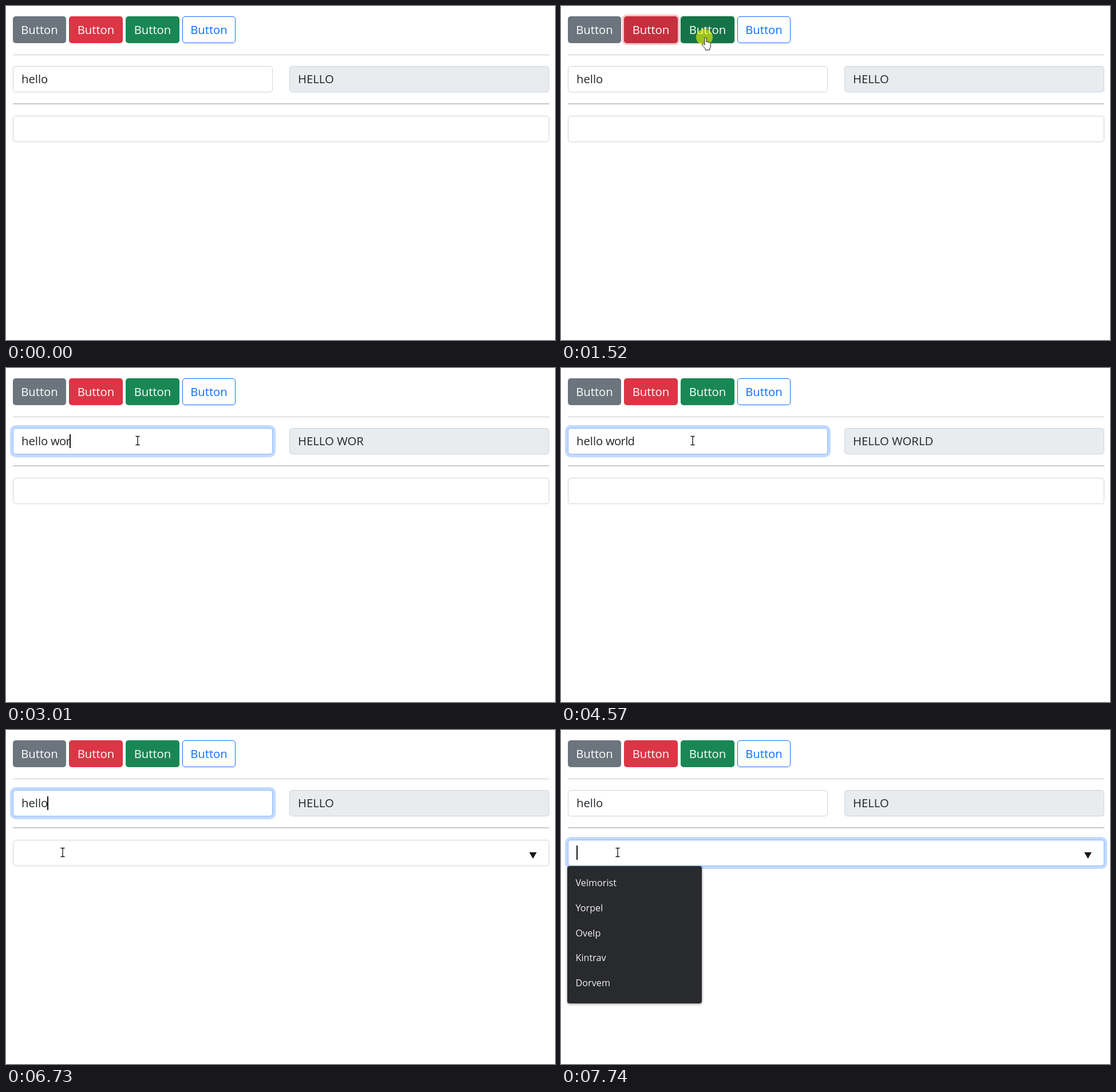
An HTML page for the animation above (8000 ms loop, 959 px wide and 584 px high).

```html
<!DOCTYPE html>
<html lang="en">
<head>
<meta charset="utf-8">
<title>Form controls</title>
<style>
html, body { margin: 0; width: 100%; height: 100%; overflow: hidden; background: #fff; }
body { position: relative; font: 400 20.3px "Open Sans", "Noto Sans", sans-serif; color: #212529; }
body *, .mouse { box-sizing: border-box; }
body > * { position: absolute; }

/* every part runs on the same 8 s clock */
.btn, .field, .mouse { animation: 8s ease-in-out infinite; }
.step { animation: 8s step-end infinite; }

.btn { top: 18px; width: 93px; height: 47px; border: 1px solid transparent; border-radius: 5px;
  line-height: 44px; text-align: center; color: #fff; }
.grey { left: 12px; background: #6c757d; background-clip: border-box; animation-name: grey; }
.red { left: 110px; width: 94px; background: #dc3545; animation-name: red; }
.green { left: 209px; width: 94px; background: #198754; animation-name: green; }
.blue { left: 308px; border-color: #0d6efd; color: #0d6efd; animation-name: blue; }

.rule { left: 12px; width: 937px; height: 1px; top: 85px; background: #c8c9cb; }
.rule.low { top: 170px; height: 2px; background: #c7c8ca; }

.field { left: 12px; top: 105px; width: 454px; height: 46px; padding-left: 14px; line-height: 42px;
  border: 1px solid #ced4da; border-radius: 5px; background: #fff; white-space: pre; }
.first { animation-name: first; }
.upper { left: 495px; background: #e9ecef; }
.list { top: 192px; width: 937px; animation-name: list; }
.tail { letter-spacing: -.7px; }
.w { animation-name: w; } .o { animation-name: o; } .r { animation-name: r; }
.l { animation-name: l; } .d { animation-name: d; }

.caret { width: 2px; height: 24px; background: #111; top: 116px; left: 72px; animation-name: caret; }
.caret.low { top: 202px; left: 27px; height: 25px; animation-name: caret-low; }

.toggle { left: 914px; top: 213px; animation-name: toggle; }
.menu { left: 11px; top: 238px; width: 234.5px; height: 239.5px; padding: 8px 0 0 14.5px; border-radius: 4px;
  background: #292a2d; box-shadow: 0 1px 4px rgba(0,0,0,.45); color: #f1f1f2;
  font-size: 16.2px; line-height: 43.8px; animation-name: menu; }

.mouse { left: 0; top: 0; width: 1px; height: 1px; overflow: visible; animation-name: move; animation-timing-function: linear; }
.mouse path { fill: #fff; stroke: #111; stroke-linejoin: round; }
.mouse .beam { fill: none; stroke-width: 1.3; animation-name: beam; }
.arrow { animation-name: arrow; }
.hand { animation-name: hand; }
.spot { fill: rgba(255,255,0,.58); animation-name: spot; }

@keyframes grey {
  0%, 6.5% { background-color: #6c757d; }
  8.375%, 14.125% { background-color: #5c636a; }
  0%, 8.75% { box-shadow: 0 0 0 0 rgba(130,138,145,0); }
  10.625%, 14.125% { box-shadow: 0 0 0 5px rgba(130,138,145,.5); }
  16%, 100% { background-color: #6c757d; box-shadow: 0 0 0 0 rgba(130,138,145,0); }
}
@keyframes red {
  0%, 11.875% { background-color: #dc3545; }
  13.75%, 18.25% { background-color: #bb2d3b; }
  0%, 14.125% { box-shadow: 0 0 0 0 rgba(225,83,97,0); }
  16%, 18.25% { box-shadow: 0 0 0 5px rgba(225,83,97,.5); }
  20.125%, 100% { background-color: #dc3545; box-shadow: 0 0 0 0 rgba(225,83,97,0); }
}
@keyframes green {
  0%, 16.25% { background-color: #198754; }
  18.125%, 22.375% { background-color: #157347; }
  0%, 18.25% { box-shadow: 0 0 0 0 rgba(60,153,110,0); }
  20.125%, 22.375% { box-shadow: 0 0 0 5px rgba(60,153,110,.5); }
  24.25%, 100% { background-color: #198754; box-shadow: 0 0 0 0 rgba(60,153,110,0); }
}
@keyframes blue {
  0%, 20.375% { background-color: #fff; color: #0d6efd; }
  22.25%, 24.38% { background-color: #0d6efd; color: #fff; }
  26.25%, 100% { background-color: #fff; color: #0d6efd; }
  0%, 22.375% { box-shadow: 0 0 0 0 rgba(13,110,253,0); }
  24.25%, 27.375% { box-shadow: 0 0 0 5px rgba(13,110,253,.5); }
  29.25%, 100% { box-shadow: 0 0 0 0 rgba(13,110,253,0); }
}
@keyframes first {
  0%, 27.375% { border-color: #ced4da; box-shadow: 0 0 0 0 rgba(13,110,253,0); }
  29.25%, 84.9% { border-color: #86b7fe; box-shadow: 0 0 0 5px rgba(13,110,253,.25); }
  86.75%, 100% { border-color: #ced4da; box-shadow: 0 0 0 0 rgba(13,110,253,0); }
}
@keyframes list {
  0%, 84.9% { border-color: #ced4da; box-shadow: 0 0 0 0 rgba(13,110,253,0); }
  86.75%, 100% { border-color: #86b7fe; box-shadow: 0 0 0 5px rgba(13,110,253,.25); }
}

/* typing */
@keyframes w { 0%, 63.25% { opacity: 0; } 35.25% { opacity: 1; } 100% { opacity: 0; } }
@keyframes o { 0%, 63.25% { opacity: 0; } 36.43% { opacity: 1; } 100% { opacity: 0; } }
@keyframes r { 0%, 63.25% { opacity: 0; } 37.6% { opacity: 1; } 100% { opacity: 0; } }
@keyframes l { 0%, 63.25% { opacity: 0; } 39.75% { opacity: 1; } 100% { opacity: 0; } }
@keyframes d { 0%, 63.25% { opacity: 0; } 41.6% { opacity: 1; } 100% { opacity: 0; } }
@keyframes caret {
  0% { opacity: 0; left: 72px; }
  27.4% { opacity: 1; left: 72px; }
  32.12% { opacity: 1; left: 77px; }
  35.25% { opacity: 1; left: 92px; }
  36.43% { opacity: 1; left: 104px; }
  37.6% { opacity: 1; left: 111px; }
  39.75% { opacity: 1; left: 117px; }
  41.6% { opacity: 1; left: 129px; }
  47% { opacity: 0; left: 129px; }
  52.37% { opacity: 1; left: 129px; }
  57.12% { opacity: 0; left: 129px; }
  66.62% { opacity: 1; left: 77px; }
  71.99% { opacity: 0; left: 77px; }
  76.62% { opacity: 1; left: 72px; }
  84.95%, 100% { opacity: 0; left: 72px; }
}
@keyframes caret-low {
  0%, 90.62% { opacity: 0; }
  84.95%, 96.74%, 100% { opacity: 1; }
}
@keyframes toggle { 0% { opacity: 0; } 83%, 100% { opacity: 1; } }
@keyframes menu { 0% { opacity: 0; } 85.86%, 100% { opacity: 1; } }

/* pointer */
@keyframes move {
  0%, 1.625% { transform: translate(343px, 270px); }
  3.75% { transform: translate(197px, 168px); }
  5.4% { transform: translate(98px, 102px); }
  6.5% { transform: translate(76px, 68px); }
  7.75%, 10.9% { transform: translate(66px, 50px); }
  11.75% { transform: translate(104px, 51px); }
  12.5% { transform: translate(147px, 50px); }
  13.25%, 15.6% { transform: translate(153px, 51px); }
  16.9% { transform: translate(238px, 57px); }
  17.5%, 19.6% { transform: translate(252px, 55px); }
  21% { transform: translate(327px, 53px); }
  21.75%, 22.9% { transform: translate(340px, 52px); }
  23.65% { transform: translate(318px, 70px); }
  24.375% { transform: translate(286px, 94px); }
  25.9% { transform: translate(243px, 117px); }
  27%, 80.5% { transform: translate(230px, 127px); }
  82.2% { transform: translate(160px, 172px); }
  83.8%, 100% { transform: translate(99px, 214px); }
}
@keyframes arrow {
  0%, 6.6%, 25.3%, 82.9%, 100% { opacity: 0; }
  1.625%, 23.5%, 81.4% { opacity: 1; }
}
@keyframes hand { 0%, 23.5%, 100% { opacity: 0; } 6.6% { opacity: 1; } }
@keyframes beam { 0%, 81.4% { opacity: 0; } 25.3%, 82.9%, 100% { opacity: 1; } }
@keyframes spot {
  0%, 10.2%, 15.6%, 19.6%, 23.4%, 28.9%, 86.7%, 100% { opacity: 0; }
  8.7%, 14.1%, 18.2%, 22.35%, 27.35%, 85% { opacity: 1; }
}
</style>
</head>
<body>
<div class="btn grey">Button</div>
<div class="btn red">Button</div>
<div class="btn green">Button</div>
<div class="btn blue">Button</div>

<div class="rule"></div>
<div class="field first">hello<span class="tail"> <span class="step w">w</span><span class="step o">o</span><span class="step r">r</span><span class="step l">l</span><span class="step d">d</span></span></div>
<div class="field upper">HELLO <span class="step w">W</span><span class="step o">O</span><span class="step r">R</span><span class="step l">L</span><span class="step d">D</span></div>
<div class="rule low"></div>
<div class="field list"></div>

<div class="caret step"></div>
<div class="caret low step"></div>
<svg class="toggle step" width="14" height="13"><path d="M0 .7H13L6.5 12Z" fill="#16181a"/></svg>
<div class="menu step">
  <div>Velmorist</div>
  <div>Yorpel</div>
  <div>Ovelp</div>
  <div>Kintrav</div>
  <div>Dorvem</div>
</div>

<svg class="mouse">
  <circle class="spot step" cx="-1.5" cy="-.5" r="14.5"/>
  <path class="arrow step" d="M.5 .5V16.3L4.2 13L6.6 18.8L9 17.8L6.6 12.1H11.6Z"/>
  <path class="hand step" d="M-1.2 1.8a1.6 1.6 0 0 1 3.2 0V8a1.5 1.5 0 0 1 2.7 .6a1.5 1.5 0 0 1 2.6 .6a1.4 1.4 0 0 1 2 1.2V15C9.3 18 7.6 18.5 7.6 22H.6C.6 19-3.4 16.5-5.4 12.8C-6.2 11-4.4 10-3.2 11.2L-1.2 13.2Z"/>
  <path class="beam step" d="M-3.5 -7.5H-1Q0 -7.5 0 -6.5Q0 -7.5 1 -7.5H3.5M0 -6.5V6.5M-3.5 7.5H-1Q0 7.5 0 6.5Q0 7.5 1 7.5H3.5"/>
</svg>
</body>
</html>
```
